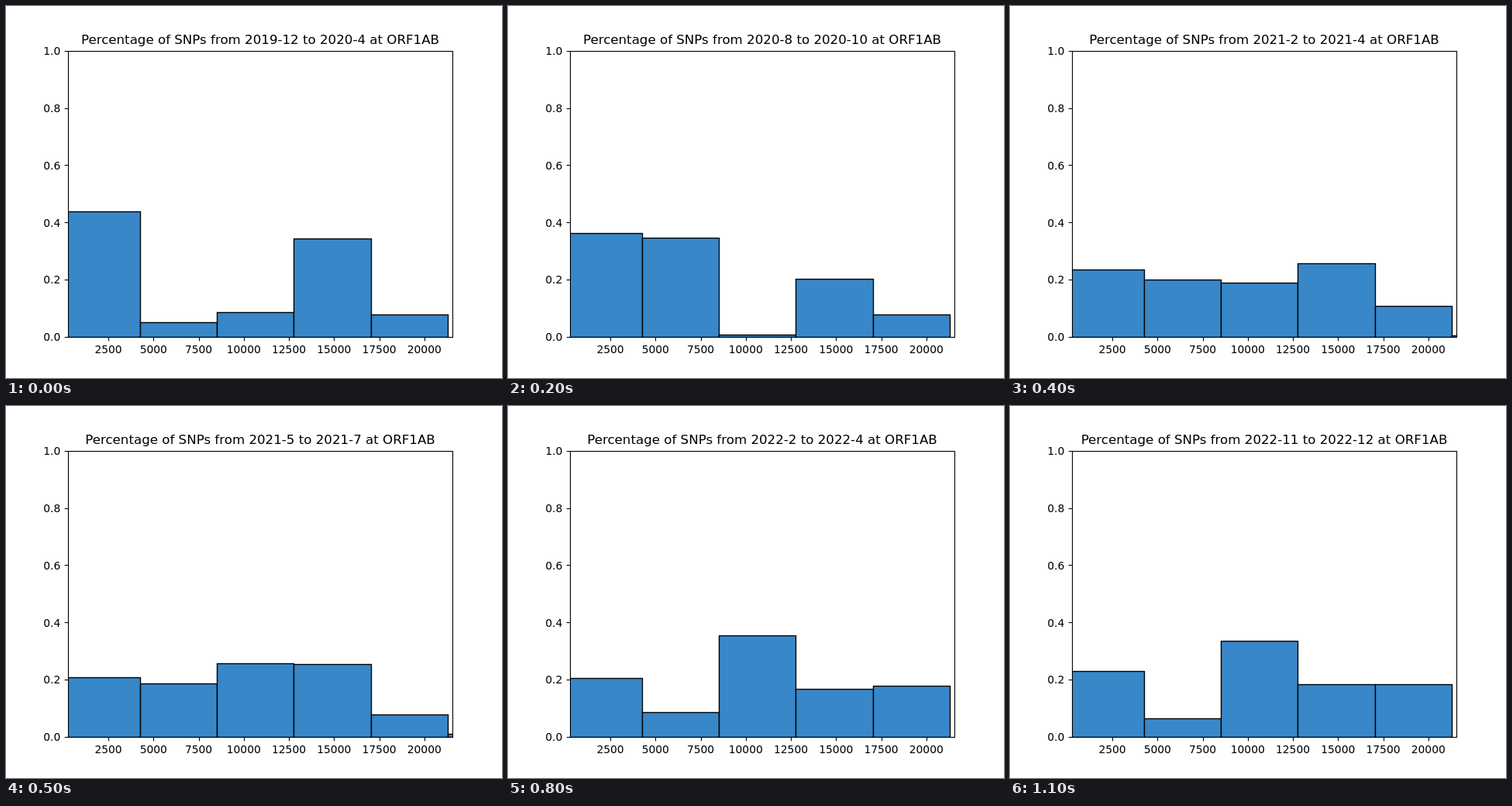
An HTML page for the animation above (1.2 s loop, 640 by 480 pixels).

```html
<!DOCTYPE html>
<html lang="en">
<head>
<meta charset="utf-8">
<title>SNP histogram</title>
<style>
  html, body { margin: 0; width: 100%; height: 100%; overflow: hidden; background: #fff; }
  svg { display: block; width: 640px; height: 480px; }
  text { font: 13.889px "DejaVu Sans", sans-serif; text-anchor: middle; fill: #000; }
  .ylabel { text-anchor: end; }
  .title { font-size: 16.667px; }
  .bar { fill: #3787c9; stroke: #000; stroke-width: 1.389; }
  .axis { fill: none; stroke: #000; stroke-width: 1.111; }
  .step { visibility: hidden; animation: show 1200ms step-end infinite; }
  @keyframes show {
    0% { visibility: visible; }
    8.33334%, 100% { visibility: hidden; }
  }
</style>
</head>
<body>
<svg viewBox="0 0 640 480">
  <defs><clipPath id="plot"><rect x="80" y="57.6" width="496" height="369.6"/></clipPath></defs>
  <g id="steps"></g>
  <g id="axes"><rect class="axis" x="80.5" y="58.5" width="496" height="369"/></g>
</svg>
<script>
const LOOP = 1200, STEP = 100, BASE = 427.5, BIN = 4258;

// Date range, then the pixel row of each bar's top edge
const periods = [
  ['2019-12 to 2020-4', 265, 408, 395, 300, 398],
  ['2020-5 to 2020-7', 279, 354, 410, 326, 398],
  ['2020-8 to 2020-10', 293, 299, 424, 352, 398],
  ['2020-11 to 2021-1', 329, 348, 383, 332, 376, 426],
  ['2021-2 to 2021-4', 340, 353, 357, 332, 387, 425],
  ['2021-5 to 2021-7', 350, 358, 332, 333, 398, 423],
  ['2021-8 to 2021-10', 354, 358, 326, 340, 392, 424],
  ['2021-11 to 2022-1', 358, 359, 320, 346, 386, 424],
  ['2022-2 to 2022-4', 351, 395, 296, 365, 361],
  ['2022-5 to 2022-7', 348, 398, 298, 363, 360],
  ['2022-8 to 2022-10', 345, 400, 301, 361, 360],
  ['2022-11 to 2022-12', 342, 403, 303, 359, 359]
];

const snap = v => Math.floor(v + 0.5) + 0.5;
const xOf = v => 80 + (v - 266) * 496 / 21289;
const yOf = v => 427.2 - v * 369.6;

function add(parent, tag, attrs, text) {
  const el = document.createElementNS('http://www.w3.org/2000/svg', tag);
  for (const name in attrs) el.setAttribute(name, attrs[name]);
  if (text) el.textContent = text;
  return parent.appendChild(el);
}

const steps = document.getElementById('steps');
periods.forEach(([range, ...tops], i) => {
  const group = add(steps, 'g', { class: 'step' });
  group.style.animationDelay = `${i * STEP - LOOP}ms`;
  const bars = add(group, 'g', { 'clip-path': 'url(#plot)' });
  tops.forEach((top, k) => {
    const x = snap(xOf(k * BIN));
    const width = snap(xOf((k + 1) * BIN)) - x;
    add(bars, 'rect', { class: 'bar', x, y: top + 0.5, width, height: BASE - top - 0.5 });
  });
  add(group, 'text', { class: 'title', x: 328, y: 49 },
    `Percentage of SNPs from ${range} at ORF1AB`);
});

const axes = document.getElementById('axes');
for (let v = 2500; v <= 20000; v += 2500) {
  const x = xOf(v);
  add(axes, 'path', { class: 'axis', d: `M${snap(x)} 427.5v4.86` });
  add(axes, 'text', { x, y: 448 }, String(v));
}
for (let k = 0; k <= 5; k++) {
  const y = yOf(k / 5);
  add(axes, 'path', { class: 'axis', d: `M80.5 ${snap(y)}h-4.86` });
  add(axes, 'text', { class: 'ylabel', x: 70.3, y: Math.round(y + 5.2) }, (k / 5).toFixed(1));
}
</script>
</body>
</html>
```
